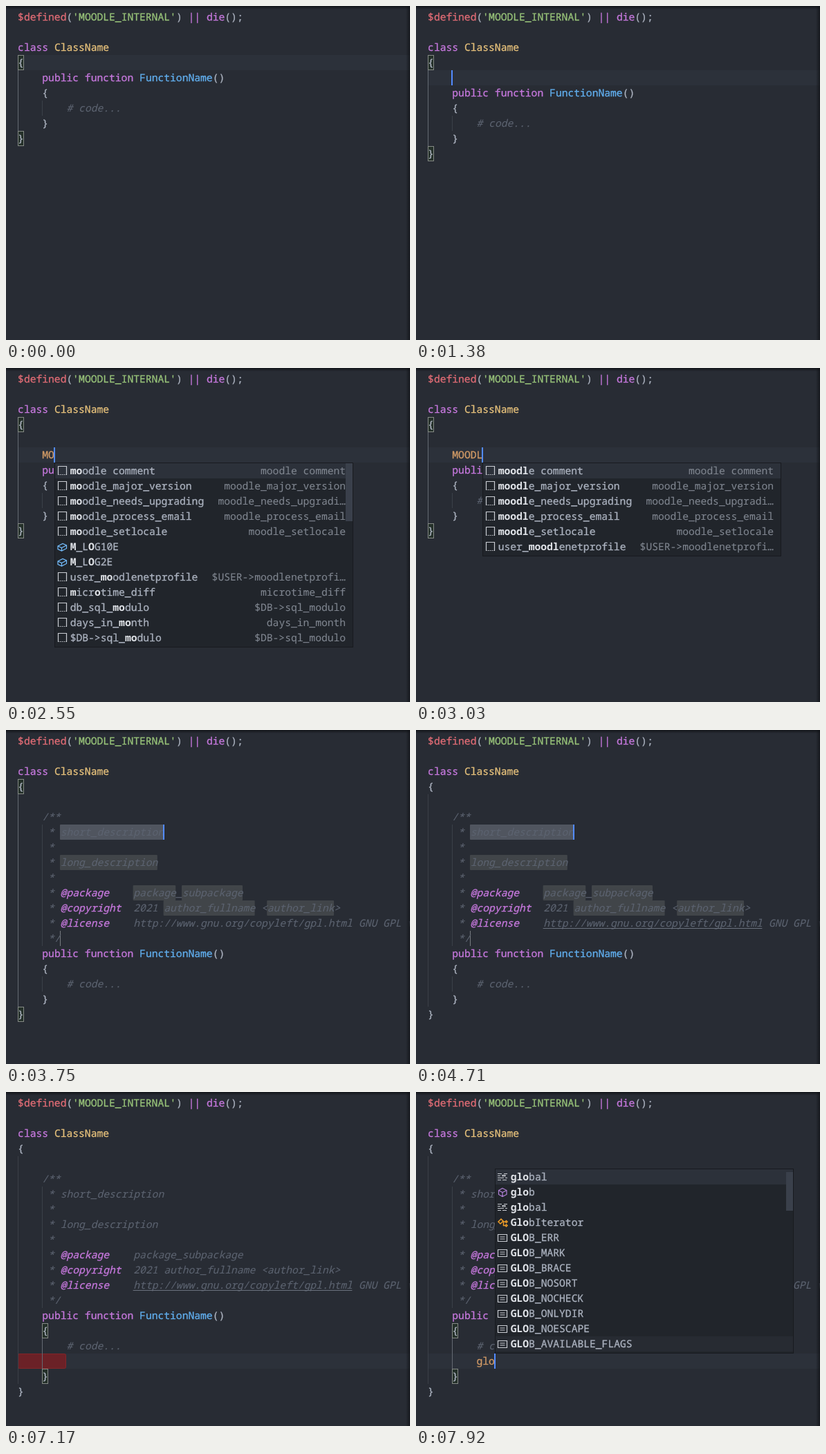
An HTML page that plays this animation: 584 px wide and 484 px high, repeating every 8000 ms.

```html
<!DOCTYPE html>
<html lang="en">
<head>
<meta charset="utf-8">
<title>Editor snippet</title>
<style>
html, body { margin: 0; width: 100%; height: 100%; overflow: hidden; background: #282c34; }
svg { display: block; width: 584px; height: 484px; }
text {
  font: 14.667px "Noto Sans Mono", "DejaVu Sans Mono", monospace;
  text-rendering: geometricPrecision;
  white-space: pre;
  color: #abb2bf;
  fill: currentColor;
  stroke: currentColor;
  stroke-width: .3;
}
.red { color: #e06c75; } .str { color: #98c379; } .key { color: #c678dd; }
.cls { color: #e5c07b; } .fn { color: #61afef; } .con { color: #d19a66; }
.com { color: #5c6370; font-style: italic; stroke-width: .1; }
.tag { color: #c678dd; font-style: italic; }
.dim { color: #7f858f; stroke-width: .1; }
.hit { color: #dfe2e7; font-weight: bold; stroke-width: 0; }
.ico { fill: none; stroke: #c9ccd2; stroke-width: 1.2; }
</style>
</head>
<body>
<svg viewBox="0 0 584 484">
  <defs>
    <linearGradient id="top" x2="0" y2="1"><stop stop-color="#0d0f13" stop-opacity=".8"/><stop offset="1" stop-color="#0d0f13" stop-opacity="0"/></linearGradient>
    <linearGradient id="side"><stop stop-color="#0d0f13" stop-opacity="0"/><stop offset="1" stop-color="#0d0f13" stop-opacity=".7"/></linearGradient>
  </defs>
  <g id="view"></g>
  <rect width="584" height="5" fill="url(#top)"/>
  <rect x="578" width="6" height="484" fill="url(#side)"/>
</svg>
<script>
const LOOP = 8000, CHAR = 8.8, LINE = 22, LEFT = 16.4, TOP = 5;
const view = document.getElementById('view');

const px = col => LEFT + col * CHAR;
const py = row => TOP + row * LINE;
const esc = s => s.replace(/&/g, '&amp;').replace(/</g, '&lt;').replace(/>/g, '&gt;');
const rect = (x, y, w, h, fill, more = '') =>
  `<rect x="${x}" y="${y}" width="${w}" height="${h}" fill="${fill}" ${more}/>`;
const label = (x, y, s, cls = '') =>
  `<text x="${(x + .7).toFixed(2)}" y="${y + 16}" class="${cls}">${esc(s)}</text>`;
const put = (row, col, s, cls) => label(px(col), py(row), s, cls);

// A row of [text, class] pieces set one after the other
function line(row, col, ...parts) {
  let out = '';
  for (const [s, cls] of parts) {
    out += put(row, col, s, cls);
    col += s.length;
  }
  return out;
}

// ---- completion lists: [icon, name, detail] ----
const same = s => ['snip', s, s.length > 21 ? s.slice(0, 20) + '…' : s];
const moodle = ['moodle comment', 'moodle_major_version', 'moodle_needs_upgrading',
  'moodle_process_email', 'moodle_setlocale'].map(same);
const profile = ['snip', 'user_moodlenetprofile', '$USER->moodlenetprofi…'];
const lists = {
  wide: [...moodle, ['field', 'M_LOG10E', ''], ['field', 'M_LOG2E', ''], profile,
    same('microtime_diff'), ['snip', 'db_sql_modulo', '$DB->sql_modulo'],
    same('days_in_month'), same('$DB->sql_modulo')],
  mid: [...moodle, profile, ...['remove_old_data', 'move_block_down',
    'remove_course_mods', 'mod_folder_dir'].map(same)],
  few: [...moodle, profile],
  glob: [['word', 'global'], ['cube', 'glob'], ['word', 'global'], ['class', 'GlobIterator'],
    ...['ERR', 'MARK', 'BRACE', 'NOSORT', 'NOCHECK', 'ONLYDIR', 'NOESCAPE', 'AVAILABLE_FLAGS']
      .map(s => ['const', 'GLOB_' + s])]
};
const cube = 'M7 1.5 13 4.5V10.5L7 13.5 1.5 10.5V4.5ZM1.5 4.5 7 7.5 13 4.5M7 7.5V13.5';
const icons = {
  snip: '<path d="M1.5 13V.5H13.5V13"/><path d="M1 12.5H14" stroke-dasharray="1.5 1.3"/>',
  field: '<path stroke="#75beff" d="M1 6 8 2.5 13.5 5V9.5L6.5 13 1 10.5ZM1 6 6.5 8.5 13.5 5M6.5 8.5V13"/>',
  cube: `<path stroke="#b180d7" d="${cube}"/>`,
  word: '<path d="M0 2.5H6M9 2.5H14M0 5.5H4M0 8.5H9M11 8.5H14M0 11.5H5M7 11.5H13"/><path d="M7 4.5H11V6H7Z"/>',
  class: '<path stroke="#ee9d28" stroke-width="1.5" d="M1 6 5 2 8 5 4 9ZM7 6H11M8.5 6V11.5H11M11 6 12.5 4.5 14 6 12.5 7.5ZM11 11.5 12.5 10 14 11.5 12.5 13Z"/>',
  const: '<path d="M.5 2.5H13.5V12.5H.5ZM3.5 6H10.5M3.5 9H10.5"/>'
};

// Which letters of a name match what was typed
function matches(name, typed) {
  const low = name.toLowerCase(), want = typed.toLowerCase(), hits = new Set();
  const at = low.indexOf(want);
  let from = 0;
  [...want].forEach((ch, i) => {
    const k = at < 0 ? low.indexOf(ch, from) : at + i;
    if (k >= 0) { hits.add(k); from = k + 1; }
  });
  return hits;
}

function popup(s) {
  const items = lists[s.pop], glob = s.pop === 'glob';
  const x = Math.floor(px(s.col)) + 1, w = 432, h = items.length * LINE + 4;
  const y = glob ? 111 : 137;
  let out = rect(x + .5, y + .5, w - 1, h - 1, '#21252b', 'stroke="#181a1f"');
  out += rect(x + 1, y + 1, w - 2, LINE, '#2c313a');
  // the pointer rests on the last row
  if (glob) out += rect(x + 1, y + 1 + 11 * LINE, w - 2, LINE, '#272b32');
  items.forEach(([icon, name, detail], i) => {
    const iy = y + 1 + i * LINE, hits = matches(name, s.typed);
    out += `<g class="ico" transform="translate(${x + 4} ${iy + 4})">${icons[icon]}</g>`;
    for (let a = 0, b; a < name.length; a = b) {
      const on = hits.has(a);
      for (b = a + 1; b < name.length && hits.has(b) === on;) b++;
      out += label(x + 22 + a * CHAR, iy, name.slice(a, b), on ? 'hit' : '');
    }
    if (detail) out += label(x + 420.5 - detail.length * CHAR, iy, detail, 'dim');
  });
  if (glob) out += rect(x + w - 11, y + 5, 10, 56, '#3a404b');
  if (s.pop === 'wide') out += rect(x + w - 11, y + 1, 10, 84, '#3a404b');
  return out;
}

// ---- document ----
function comment(s) {
  const tag = s.tags ? 'tag' : 'com';
  let out = '';
  if (s.holes) {
    const hole = (row, col, n, fill = '#414549') => rect(px(col), py(row), n * CHAR, LINE, fill, 'rx="1"');
    out += hole(6, 7, 17, '#50555f') + hole(8, 7, 16) + hole(10, 19, 7) + hole(10, 27, 10) +
      hole(11, 24, 15) + hole(11, 41, 11) + rect(78, py(13), 1, LINE, '#777b80');
  }
  out += put(5, 4, '/**', 'com');
  for (let r = 6; r < 13; r++) out += put(r, 5, '*', 'com');
  out += put(6, 7, 'short_description', 'com') + put(8, 7, 'long_description', 'com');
  ['package', 'copyright', 'license'].forEach((t, i) => out += put(10 + i, 7, '@' + t, tag));
  out += put(10, 19, 'package_subpackage', 'com') +
    put(11, 19, '2021 author_fullname <author_link>', 'com') +
    put(12, 19, 'http://www.gnu.org/copyleft/gpl.html', 'com') +
    put(12, 56, 'GNU GPL v3 or later', 'com') + put(13, 5, '*/', 'com');
  if (s.link) out += rect(px(19), py(12) + 18, 36 * CHAR, 1, '#6a717d');
  return out;
}

function draw(s) {
  const m = s.doc ? 14 : 4 + s.gap, end = m + 3 + s.extra;
  const guide = (col, a, b, on) =>
    rect(Math.round(px(col)) + (col ? 0 : 1), py(a), 1, (b - a) * LINE, on ? '#646a73' : '#3b4048');
  const box = (row, col) => rect(Math.floor(px(col)) + 1.5, py(row) + .5, 8, 21, '#243029', 'stroke="#858a85"');
  let out = '';

  if (!s.holes) out += rect(17, py(s.row), 567, LINE, '#2c313a');
  if (s.red) out += rect(17.5, py(s.row) + .5, Math.floor(px(s.red)) - 17, 21, '#6b2127', 'stroke="#842529" rx="2"');
  out += guide(0, 4, end + 1, s.scope === 'outer') + guide(4, m + 2, end, s.scope === 'inner');
  if (s.doc) out += guide(4, 6, 14);
  if (s.scope === 'outer') out += box(3, 0) + box(end + 1, 0);
  if (s.scope === 'inner') out += box(m + 1, 4) + box(end, 4);

  out += line(0, 0, ['$defined', 'red'], ['('], ["'MOODLE_INTERNAL'", 'str'], [') '],
    ['|| ', 'key'], ['die', 'key'], ['();']);
  out += line(2, 0, ['class ', 'key'], ['ClassName', 'cls']) + put(3, 0, '{');
  if (s.doc) out += comment(s);
  out += line(m, 4, ['public function ', 'key'], ['FunctionName', 'fn'], ['()']) + put(m + 1, 4, '{') +
    put(m + 2, 8, '# code...', 'com') + put(end, 4, '}') + put(end + 1, 0, '}');
  if (s.typed) out += put(s.row, s.col - s.typed.length, s.typed, 'con');
  if (s.pop) out += popup(s);
  if (s.caret) out += rect(Math.floor(px(s.col)), py(s.row), 2, LINE, '#528bff');
  view.innerHTML = out;
}

// ---- timeline: each step changes part of the state ----
const type = (typed, col, pop) => ({ typed, col, pop, caret: 1 });
const on = { caret: 1 }, off = { caret: 0 };
let last = { doc: 0, gap: 0, extra: 0, row: 3, col: 1, caret: 0, scope: 'outer', typed: '', pop: '' };
const steps = [
  [0, {}], [540, on], [1020, off],
  [1380, { gap: 1, row: 4, col: 4, caret: 1 }], [1410, { red: 4 }],
  [1560, { gap: 2, row: 5, red: 0 }], [1590, { red: 4 }], [2040, off],
  [2310, { ...type('M', 5), red: 5 }], [2340, { red: 0 }], [2400, { pop: 'wide' }],
  [2550, type('MO', 6, 'wide')], [2730, type('MOO', 7, 'mid')], [2880, type('MOOD', 8, 'mid')],
  [3030, type('MOODL', 9, 'few')], [3150, type('MOODLE', 10, 'few')],
  [3630, { ...type('', 24, ''), doc: 1, row: 6 }], [3660, { holes: 1 }],
  [3720, { tags: 1 }], [3810, { scope: '' }],
  [4260, off], [4710, { caret: 1, link: 1 }], [5190, off], [5640, on],
  [6060, { holes: 0, row: 16, col: 17, caret: 1 }], [6090, { scope: 'inner' }], [6540, off],
  [6600, { extra: 1, row: 17, col: 8, caret: 1 }], [6690, { red: 8 }], [7170, off],
  [7590, { ...type('g', 9), red: 9 }], [7620, { red: 0 }], [7680, { pop: 'glob' }],
  [7770, type('gl', 10, 'glob')], [7920, type('glo', 11, 'glob')]
].map(([at, change]) => ({ at, state: last = { ...last, ...change } }));

const start = performance.now();
let shown;
function tick() {
  const t = (performance.now() - start) % LOOP;
  const now = steps.filter(s => s.at <= t).pop();
  if (now !== shown) draw((shown = now).state);
  requestAnimationFrame(tick);
}
tick();
</script>
</body>
</html>
```
